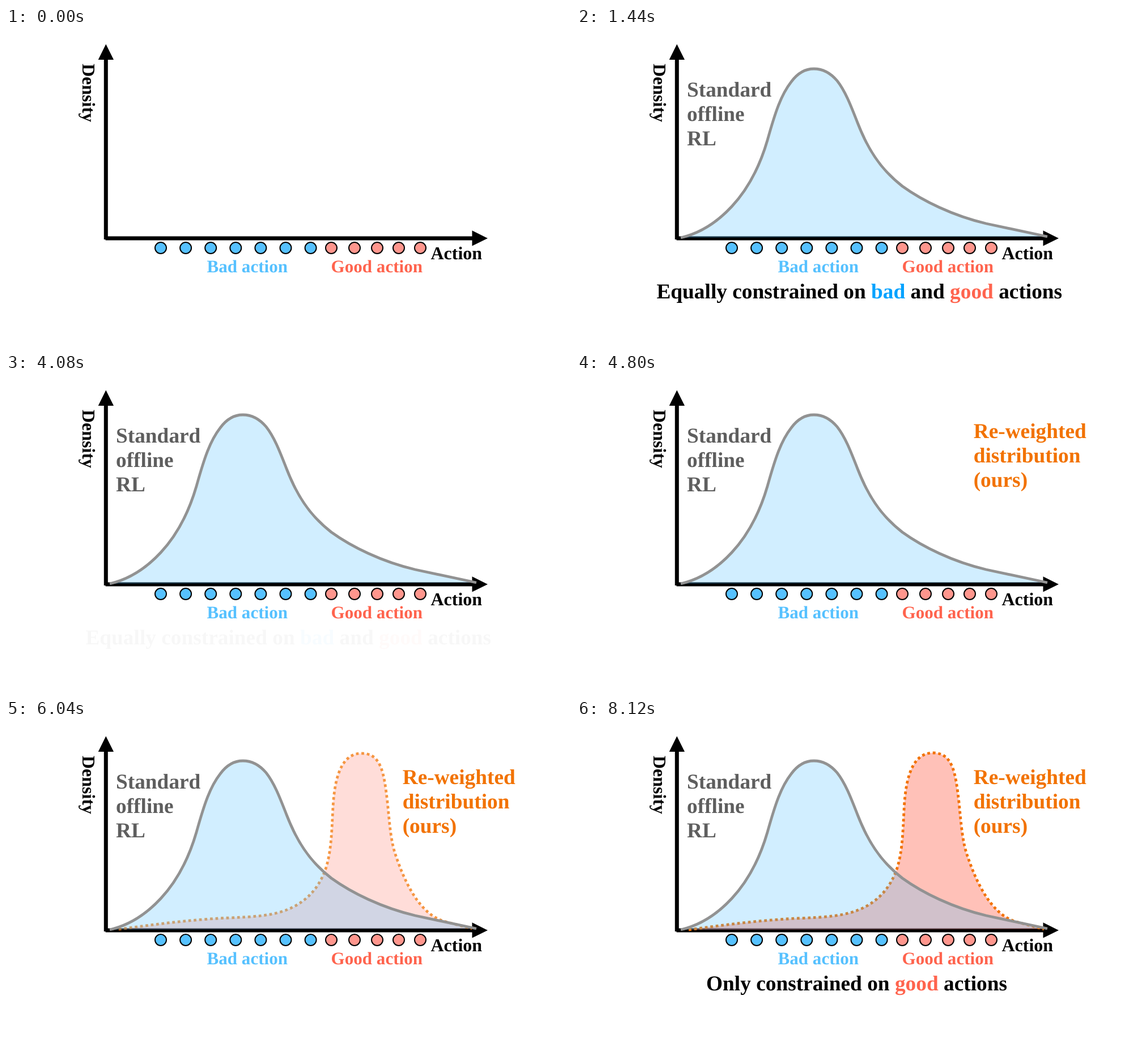
An HTML page that plays this animation: 997x561 px, repeating every 8680 ms.

```html
<!DOCTYPE html>
<html lang="en">
<head>
<meta charset="utf-8">
<title>Action density</title>
<style>
  html, body { margin: 0; width: 100%; height: 100%; overflow: hidden; background: #fff; }
  svg { display: block; width: 997px; height: 561px; }
  text { font-family: "Liberation Serif", "Times New Roman", Times, serif; font-weight: bold; text-rendering: geometricPrecision; }
  .axis { font-size: 32px; }
  .label { font-size: 31.1px; }
  .big { font-size: 37.33px; }
  .caption { text-anchor: middle; }
  .blue { fill: #56c1ff; }
  .red { fill: #ff644e; }
  .line { fill: none; stroke-width: 4.8; }
</style>
</head>
<body>
<svg viewBox="0 0 997 561" xmlns="http://www.w3.org/2000/svg">
  <g stroke="#000" stroke-width="7">
    <path d="M176.3 50V373M175.5 371H826"/>
    <path stroke="none" d="M176.3 28.5L190 56H162.7ZM850 371L822.5 384.5V357.3Z"/>
  </g>
  <g id="dots" stroke="#000" stroke-width="2"></g>
  <text class="axis" transform="translate(135 63) rotate(90)">Density</text>
  <text class="axis" x="749.5" y="408">Action</text>
  <text class="label blue" x="354.5" y="431">Bad action</text>
  <text class="label red" x="573.5" y="431">Good action</text>

  <g id="newCurve">
    <path class="area" fill="#ff644e"/>
    <path class="line" stroke="#f27200" stroke-dasharray="4.8 4.8"/>
  </g>
  <g id="oldCurve">
    <path class="area" fill="#56c1ff"/>
    <path class="line" stroke="#929292"/>
  </g>

  <text id="oldName" class="big" fill="#5e5e5e">
    <tspan x="194" y="121">Standard</tspan><tspan x="194" y="164">offline</tspan><tspan x="194" y="207">RL</tspan>
  </text>
  <text id="newName" class="big" fill="#f27200">
    <tspan x="699.7" y="113">Re-weighted</tspan><tspan x="699.7" y="156.2">distribution</tspan><tspan x="699.7" y="199.4">(ours)</tspan>
  </text>
  <g id="oldCaption">
    <text class="big caption" x="498.3" y="477">Equally constrained on <tspan fill="#00a2ff">bad</tspan> and <tspan class="red">good</tspan> actions</text>
  </g>
  <g id="newCaption">
    <text class="big caption" x="493.5" y="477">Only constrained on <tspan class="red">good</tspan> actions</text>
  </g>
</svg>
<script>
const LOOP = 8680, STEP = 40, SHRINK = 0.155;
const $ = id => document.getElementById(id);
const progress = (t, from, to) => Math.min(1, Math.max(0, (t - from) / (to - from)));
const smooth = u => u * u * (3 - 2 * u);

const curves = {
  oldCurve: "M183 370C218 362 247 343 273 315C301 285 322 246 336 198C350 148 360 118 378 95" +
    "C389 80 402 72 418 72C434 72 447 79 459 93C474 112 484 139 495 167" +
    "C504 190 513 209 526 228C540 249 555 264 574 279C610 305 663 331 722 345L830 368",
  newCurve: "M197 370C250 363 300 356 355 352C405 348 445 350 482 340C525 328 552 300 565 261" +
    "C574 232 575 200 577 160C579 115 587 58 628 58C664 58 668 95 674 145" +
    "C678 185 680 215 689 240C704 284 730 343 775 356L824 369"
};
for (const id in curves)
  for (const path of $(id).children) path.setAttribute("d", curves[id]);

const dot = fill => x => `<circle cx="${x}" cy="388" r="10" fill="${fill}"/>`;
const badX = Array.from({ length: 7 }, (_, i) => 273 + 44.1 * i);
const goodX = [574, 615, 655, 693, 731];
$("dots").innerHTML = badX.map(dot("#56c1ff")).join("") + goodX.map(dot("#ff968d")).join("");

// Fade in while growing to full size about a centre.
function grow(id, u, cx, cy, areaAlpha) {
  const el = $(id), alpha = u ** 1.5, scale = 1 - SHRINK * (1 - u) ** 2;
  el.setAttribute("opacity", alpha);
  el.setAttribute("transform", `translate(${cx} ${cy}) scale(${scale}) translate(${-cx} ${-cy})`);
  if (areaAlpha) el.querySelector(".area").setAttribute("fill-opacity", areaAlpha * alpha);
}

function draw(t) {
  $("oldName").setAttribute("opacity", progress(t, 120, 480));
  $("newName").setAttribute("opacity", progress(t, 4440, 4800));
  grow("oldCurve", progress(t, 400, 1440), 506, 221, 0.27);
  grow("newCurve", progress(t, 5160, 6240), 510, 214, 0.4);
  grow("oldCaption", progress(t, 720, 1440), 498.3, 467);
  grow("newCaption", progress(t, 6720, 8120), 493.5, 467);
  if (t > 3360) $("oldCaption").setAttribute("opacity", 1 - smooth(progress(t, 3360, 4160)));
}

const start = performance.now();
function tick() {
  const t = (performance.now() - start) % LOOP;
  draw(Math.floor(t / STEP) * STEP);
  requestAnimationFrame(tick);
}
tick();
</script>
</body>
</html>
```
